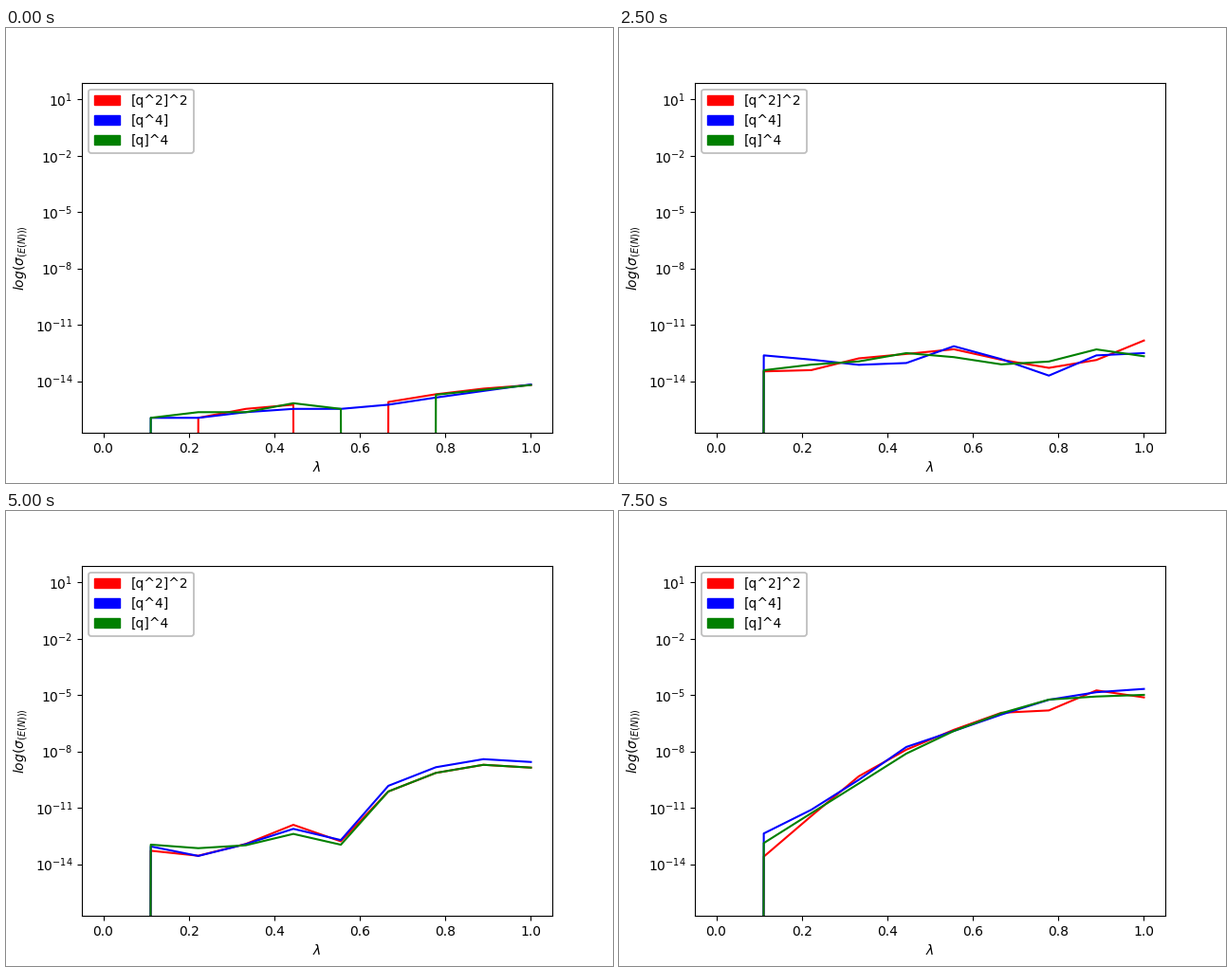
A matplotlib script that plays this animation: 640 by 480 pixels, repeating every 8000 ms.

```python
import numpy as np
import matplotlib.pyplot as plt
from matplotlib.animation import FuncAnimation
from matplotlib.patches import Patch

FRAMES, INTERVAL = 16, 500
COLORS = ["red", "blue", "green"]
LABELS = ["[q^2]^2", "[q^4]", "[q]^4"]
STEPS = np.arange(1, 10)
LAM = np.linspace(0, 1, 10)
EPS = 2.0**-53
FLOOR = -11.9  # log10 below which rounding noise dominates

# Key points (step, log10 deviation) of the common trend at some levels.
GROUND = [(1, -15.95), (2, -15.85), (4, -15.3), (5, -15.5), (7, -14.8), (9, -14.15)]
TREND = {
    3: [(1, -13.1), (3, -13.4), (4, -12.2), (6, -12.1), (7, -13.3), (8, -12.4), (9, -13)],
    5: [(1, -13.2), (3, -12.7), (5, -12.7), (7, -13.1), (9, -12.1)],
    8: [(1, -13.3), (4, -12.4), (5, -12.5), (6, -11.7), (7, -11.85), (9, -9.9)],
    10: [(1, -12.9), (2, -13.3), (4, -12), (5, -12.7), (6, -10.13), (7, -9.14), (8, -8.71), (9, -8.86)],
    12: [(1, -13.1), (3, -12), (4, -10.78), (5, -9.09), (7, -8.96), (8, -7.25), (9, -6.49)],
    15: [(1, -13.1), (3, -9.4), (4, -7.8), (6, -6.1), (8, -4.95), (9, -5)],
}
CANCELLED = [(0, 1), (0, 5), (2, 6)]  # (curve, step) without any deviation


def along(points):
    return np.interp(STEPS, *zip(*points))


def trend(level):
    """Blend the key curves; np.interp clamps the lowest levels."""
    rows = np.array([along(points) for points in TREND.values()])
    return np.array([np.interp(level, list(TREND), col) for col in rows.T])


def deviations(level):
    noise = np.random.default_rng(level).normal(0, 1, (3, STEPS.size))
    out = np.zeros((3, LAM.size))
    if level == 0:
        logs = along(GROUND) + 0.08 * noise
        out[:, 1:] = EPS * np.maximum(1, np.round(10**logs / EPS))
        for curve, step in CANCELLED:
            out[curve, step] = 0
        return out
    # Curves agree once converged, with blue twice as high, until the top levels.
    base = trend(level)
    top = level > 12
    logs = base + noise * np.where(base < FLOOR, 0.35, 0.2 * top)
    if not top:
        logs[1] += np.where(base < FLOOR, 0, np.log10(2))
    out[:, 1:] = 10**logs
    return out


fig, ax = plt.subplots(figsize=(6.4, 4.8), dpi=100)
lines = [ax.plot(LAM, np.ones_like(LAM), color=c)[0] for c in COLORS]
ax.set_yscale("log")
ax.set_xlim(-0.05, 1.05)
ax.set_ylim(10**-16.76, 10**1.9)
ax.set_yticks(10.0 ** np.arange(-14, 2, 3))
ax.minorticks_off()
ax.set_xlabel(r"$\lambda$")
ax.set_ylabel(r"$log(\sigma_{(E(N)))}$")
legend = ax.legend(handles=[Patch(color=c, label=t) for c, t in zip(COLORS, LABELS)],
                   loc="upper left", framealpha=1, edgecolor="0.75")
legend.get_frame().set_linewidth(1.3)


def update(level):
    for line, values in zip(lines, deviations(level)):
        line.set_ydata(values)
    return lines


anim = FuncAnimation(fig, update, frames=FRAMES, interval=INTERVAL,
                     repeat=True, repeat_delay=0)
plt.show()
```
